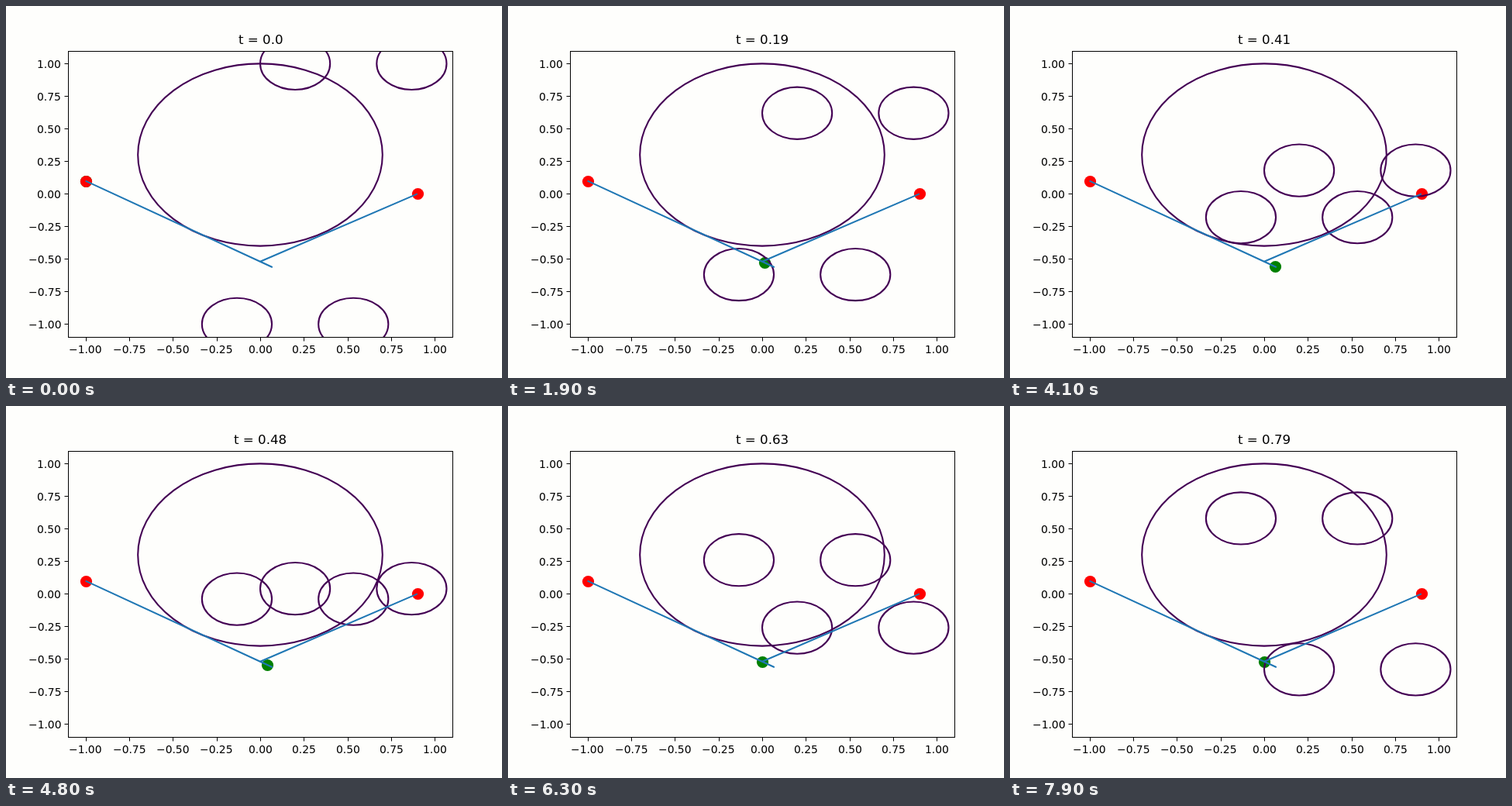
Write an HTML page with a canvas that moves like this. It is 640x480 px and loops after 8000 ms.

```html
<!DOCTYPE html>
<html lang="en">
<head>
<meta charset="utf-8">
<title>Path between moving obstacles</title>
<style>
  html, body { margin: 0; width: 100%; height: 100%; overflow: hidden; background: #fefefc; }
  canvas { display: block; }
</style>
</head>
<body>
<canvas id="stage" width="640" height="480"></canvas>
<script>
const ctx = document.getElementById('stage').getContext('2d');
const STEP = 100, STEPS = 80;
const FONT = '"DejaVu Sans", sans-serif';
const PURPLE = '#440154', BLUE = '#1f77b4', RED = '#f00', GREEN = '#008000';
const SX = 496 / 2.2, SY = 168;
const px = x => 328 + SX * x;
const py = y => 242.4 - SY * y;
const snap = v => Math.round(v) + 0.5;

const start = [-1, 0.1], turn = [1 / 15, -0.5613], bend = [0, -0.52], goal = [0.9, 0];
// One stop every 0.2 time units; repeated points are waits.
const stops = [start, turn, turn, bend, bend, goal];

// Columns of small obstacles; dir is the vertical direction of travel.
const movers = [
  { x: -2 / 15, dir: 1 }, { x: 0.2, dir: -1 },
  { x: 8 / 15, dir: 1 }, { x: 13 / 15, dir: -1 }
];

function robotAt(t) {
  const i = Math.min(Math.floor(t * 5 + 1e-9), 4), k = t * 5 - i;
  const a = stops[i], b = stops[i + 1];
  return [a[0] + (b[0] - a[0]) * k, a[1] + (b[1] - a[1]) * k];
}

function dot([x, y], color) {
  ctx.fillStyle = color;
  ctx.beginPath();
  ctx.arc(snap(px(x)), snap(py(y)), 7.6, 0, 7);
  ctx.fill();
}

function ring(x, y, r) {
  ctx.strokeStyle = PURPLE;
  ctx.beginPath();
  ctx.ellipse(px(x), py(y), r * SX, r * SY, 0, 0, 7);
  ctx.stroke();
}

function line(points, color) {
  ctx.strokeStyle = color;
  ctx.beginPath();
  for (const [x, y] of points) ctx.lineTo(x, y);
  ctx.stroke();
}

// Aligns the inked part of the text: 0.5 centres it on x, 1 ends it at x.
function text(s, x, y, size, align) {
  ctx.font = `${size}px ${FONT}`;
  const { actualBoundingBoxLeft: left, actualBoundingBoxRight: right } = ctx.measureText(s);
  ctx.fillText(s, Math.round(x - (left + right) * align) + left, Math.round(y));
}

function drawAxes() {
  ctx.lineWidth = 1;
  ctx.strokeStyle = ctx.fillStyle = '#000';
  ctx.strokeRect(80.5, 58.5, 496, 369);
  for (let i = -4; i <= 4; i++) {
    const v = i / 4, label = v.toFixed(2).replace('-', '\u2212');
    const x = snap(px(v)), y = snap(py(v));
    line([[x, 428], [x, 432.5]], '#000');
    line([[75.5, y], [80, y]], '#000');
    text(label, px(v), 448, 13.89, 0.5);
    text(label, 70.3, py(v) + 5.5, 13.89, 1);
  }
}

function draw(step) {
  const t = step / 100;
  ctx.fillStyle = '#fefefc';
  ctx.fillRect(0, 0, 640, 480);

  ctx.save();
  ctx.beginPath();
  ctx.rect(80, 58, 496, 369);
  ctx.clip();
  ctx.lineWidth = 2.08;
  ctx.lineJoin = 'round';
  dot(robotAt(t), GREEN);
  dot(start, RED);
  dot(goal, RED);
  ring(0, 0.3, 0.7);
  for (const m of movers) ring(m.x, m.dir * (2 * t - 1), 0.2);
  line([start, turn, bend, goal].map(([x, y]) => [px(x), py(y)]), BLUE);
  ctx.restore();

  drawAxes();
  const time = step % 10 ? t.toFixed(2) : t.toFixed(1);
  text('t = ' + time, 328, 49, 16.67, 0.5);
}

const begin = performance.now();
function tick() {
  draw(Math.floor((performance.now() - begin) / STEP) % STEPS);
  requestAnimationFrame(tick);
}
tick();
</script>
</body>
</html>
```
